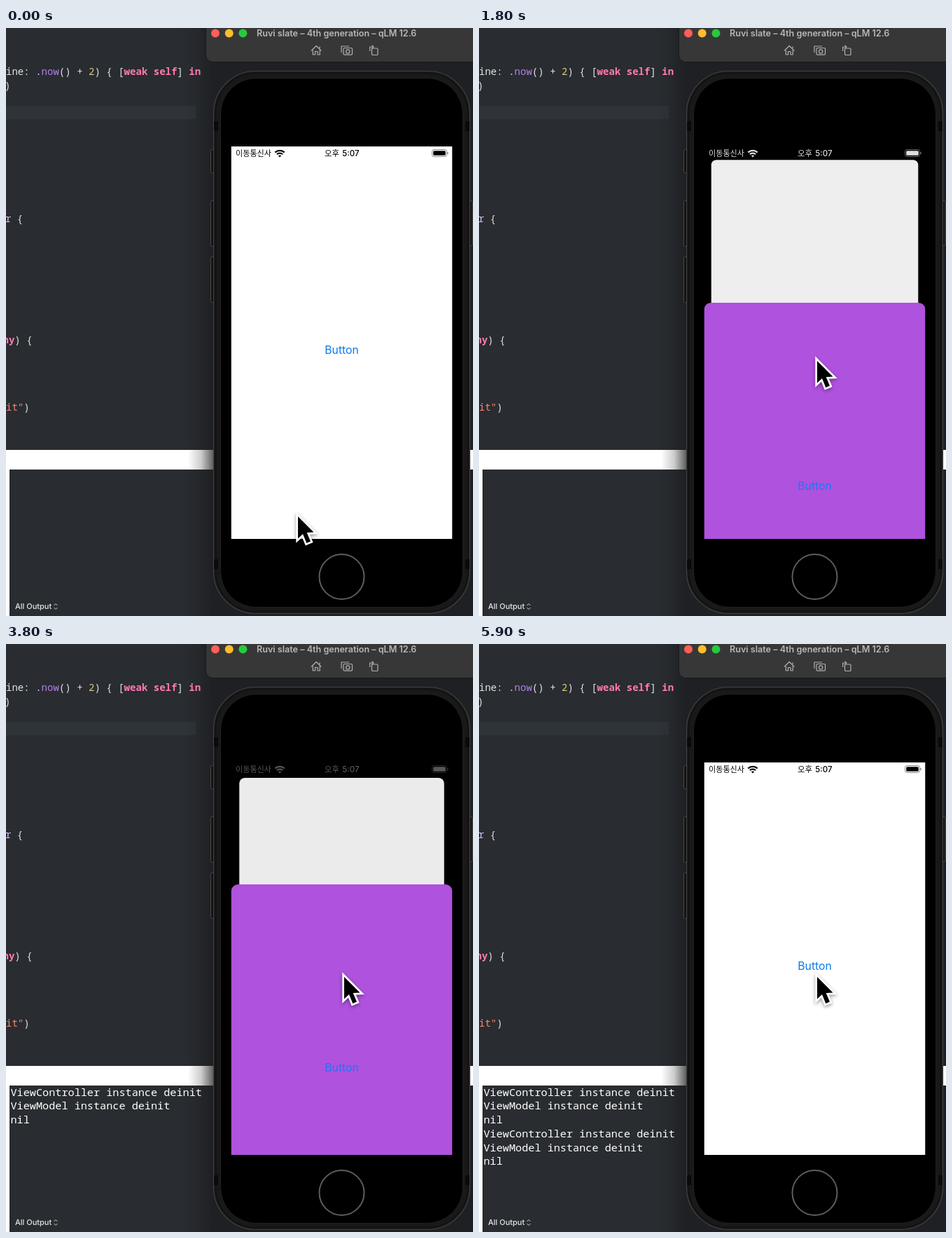
Animation, 667 px wide and 839 px high, one loop 7.9 s. Source, as an HTML page with a canvas:

```html
<!DOCTYPE html>
<html lang="en">
<head>
<meta charset="utf-8">
<title>Sheet demo</title>
<style>
  html, body { margin: 0; width: 100%; height: 100%; overflow: hidden; background: #292c30; }
  canvas { display: block; width: 667px; height: 839px; }
</style>
</head>
<body>
<canvas id="stage"></canvas>
<script>
const W = 667, H = 839, LOOP = 7900, TICK = 100;
const MONO = '"Noto Sans Mono", "DejaVu Sans Mono", monospace';
const SANS = 'Inter, Roboto, sans-serif';
const HANGUL = '"Noto Sans CJK KR", "Noto Sans CJK", "Noto Sans CJK JP", sans-serif';
const WHITE = '#e2e2e3', PINK = '#ff7ab2', BG = '#292c30';
const SCREEN = { x: 321.5, y: 169, w: 316, h: 560 };
const CX = 479.5, CY = 449;
const SHEET_TOP = 208.5, BOTTOM = 729;

// Sheet transitions: start time and direction
const MOVES = [[1004, 1], [1732, 0], [3655, 1], [4397, 0]];
const LOGS = [
  [2400, 'ViewController instance deinit'], [2400, 'ViewModel instance deinit'], [3200, 'nil'],
  [5000, 'ViewController instance deinit'], [5000, 'ViewModel instance deinit'], [5900, 'nil']
];
const PRESSES = [[900, 1100], [1700, 1800], [3600, 3700], [4300, 4400]];

const canvas = document.getElementById('stage');
const dpr = window.devicePixelRatio || 1;
canvas.width = W * dpr;
canvas.height = H * dpr;
const c = canvas.getContext('2d');

const clamp = v => Math.max(0, Math.min(1, v));
const mix = (a, b, k) => a + (b - a) * k;
const smooth = v => { v = clamp(v); return v * v * (3 - 2 * v); };
const rgb = (a, b, k) => `rgb(${a.map((v, i) => Math.round(mix(v, b[i], k))).join()})`;

// Critically damped spring, 0 to 1
function spring(ms) {
  const x = Math.max(0, ms) * 0.01826;
  return 1 - (1 + x) * Math.exp(-x);
}

function rect(x, y, w, h, fill) {
  c.fillStyle = fill;
  c.fillRect(x, y, w, h);
}

function round(x, y, w, h, r, fill, stroke, line = 1) {
  c.beginPath();
  c.roundRect(x, y, w, h, r);
  if (fill) { c.fillStyle = fill; c.fill(); }
  if (stroke) { c.strokeStyle = stroke; c.lineWidth = line; c.stroke(); }
}

function circle(x, y, r, fill, stroke, line = 1) {
  c.beginPath();
  c.arc(x, y, r, 0, Math.PI * 2);
  if (fill) { c.fillStyle = fill; c.fill(); }
  if (stroke) { c.strokeStyle = stroke; c.lineWidth = line; c.stroke(); }
}

function text(s, x, y, font, fill, align = 'left') {
  c.font = font;
  c.fillStyle = fill;
  c.textAlign = align;
  c.fillText(s, x, y);
}

function line(points, close) {
  c.beginPath();
  points.forEach(([x, y]) => c.lineTo(x, y));
  if (close) c.closePath();
}

function code(x, y, parts) {
  for (const [s, color = WHITE, weight = 500] of parts) {
    text(s, x, y, `${weight} 14.05px ${MONO}`, color);
    x += s.length * 8.43;
  }
}

function fade(x0, x1, alpha) {
  const g = c.createLinearGradient(x0, 0, x1, 0);
  g.addColorStop(0, 'rgba(0,0,0,0)');
  g.addColorStop(0.5, `rgba(0,0,0,${alpha * 0.3})`);
  g.addColorStop(1, `rgba(0,0,0,${alpha})`);
  return g;
}

function editor() {
  rect(0, 0, W, H, BG);
  rect(0, 111, 271, 19, '#2f3439');
  rect(0, 602, W, 28, '#fff');
  rect(0, 602, 5, H - 602, '#fff');
  rect(250, 0, W - 250, 602, fade(250, 296, 0.28));
  rect(250, 630, W - 250, H - 630, fade(250, 296, 0.28));
  rect(260, 602, 44, 28, fade(260, 297, 0.65));

  code(0, 67, [['ine: .'], ['now', '#b281eb'], ['() + '], ['2', '#d9c97c'], [') { ['],
    ['weak', PINK, 700], [' '], ['self', PINK, 700], ['] '], ['in', PINK, 700]]);
  code(-2, 86.5, [[')']]);
  code(-1, 277, [['r', '#dabaff'], [' {']]);
  code(-4.5, 450, [['ny', PINK, 700], [') {']]);
  code(0, 546, [['it"', '#ff8170'], [')']]);

  text('All Output', 13, 829, `500 11px ${SANS}`, '#e8e8e8');
  c.strokeStyle = '#d0d0d0';
  c.lineWidth = 1;
  line([[68.5, 824], [71, 821.5], [73.5, 824]]);
  c.stroke();
  line([[68.5, 827], [71, 829.5], [73.5, 827]]);
  c.stroke();
}

function titleBar() {
  round(285.5, -12, 400, 60.5, 10, '#373737', '#1a1a1a');
  ['#ff5f57', '#febc2e', '#28c840'].forEach((color, i) => circle(299 + i * 19.7, 7.5, 6, color));
  text('Ruvi slate – 4th generation – qLM 12.6', 358, 12, `600 12.6px ${SANS}`, '#b8b8b8');

  c.strokeStyle = '#b2b2b2';
  c.lineWidth = 1.2;
  c.lineJoin = 'round';
  line([[436, 32.5], [443.2, 25.5], [450.4, 32.5]]);
  c.stroke();
  line([[438.3, 31.5], [438.3, 38], [441.5, 38], [441.5, 33.5], [445, 33.5], [445, 38], [448.2, 38], [448.2, 31.5]]);
  c.stroke();
  line([[448, 29], [448, 26.5]]);
  c.stroke();

  line([[479, 35], [479, 26], [490, 26]]);
  c.stroke();
  round(482, 28.5, 12.5, 9.7, 1.5, '#373737', '#b2b2b2', 1.2);
  circle(488.2, 33.4, 2.6, null, '#b2b2b2', 1.2);

  round(522.5, 29, 8.5, 9.5, 1.3, null, '#b2b2b2', 1.2);
  line([[519.7, 33], [519.7, 27], [524.5, 27]]);
  c.stroke();
  line([[522.5, 24.8], [525, 27], [522.5, 29.2]]);
  c.stroke();
}

function phone() {
  for (const [y, h] of [[173, 33], [246, 65], [326, 65]]) {
    round(292.5, y + 0.5, 8, h, 2, '#111', '#4a4a4a');
  }
  round(659, 246.5, 7, 64, 2, '#111', '#4a4a4a');
  round(296.5, 61.5, 366, 774, 60, '#191919', '#424242', 1.2);
  round(299.5, 64.5, 360, 768, 57, null, '#111', 1.5);
  for (const y of [133, 758]) {
    rect(297, y, 6, 14, '#0a0a0a');
    rect(656, y, 6, 14, '#0a0a0a');
  }
  round(306.5, 71.5, 346, 755, 51, '#000', '#202020', 1);
  circle(479.5, 783, 32, '#000', '#5d5d5d', 2);
}

function buttonLabel(x, y, color, alpha) {
  c.globalAlpha = alpha;
  text('Button', x, y + 5.7, `400 15.7px ${SANS}`, color, 'center');
  c.globalAlpha = 1;
}

function statusBar(k) {
  const ink = rgb([0, 0, 0], [245, 245, 245], k);
  text('이동통신사', 328, 183, `400 11.1px ${HANGUL}`, ink);
  text('오후 ', 455, 183, `500 11.4px ${HANGUL}`, ink);
  text('5:07', 504.5, 183, `500 11.5px ${SANS}`, ink, 'right');

  c.save();
  c.beginPath();
  c.moveTo(391, 184.5);
  c.arc(391, 184.5, 11, -Math.PI * 0.74, -Math.PI * 0.26);
  c.closePath();
  c.clip();
  circle(391, 184.5, 9.6, null, ink, 2.4);
  circle(391, 184.5, 5.9, null, ink, 2.2);
  circle(391, 184.5, 3, ink);
  c.restore();

  c.globalAlpha = 0.45;
  round(608.5, 173.5, 21, 10, 3, null, ink);
  round(630.3, 176.7, 1.4, 3.6, 0.7, ink);
  c.globalAlpha = 1;
  round(610.2, 175.2, 17.6, 6.6, 1.6, ink);
}

function screen(p, ink, pressed) {
  const { x, y, w, h } = SCREEN;
  c.save();
  c.beginPath();
  c.rect(x, y, w, h);
  c.clip();
  rect(x, y, w, h, '#000');

  // Card behind the sheet
  c.save();
  c.translate(CX, CY + 1.6 * p);
  c.scale(1 - 0.1 * p, 1 - 0.1 * p);
  round(-w / 2, -h / 2, w, h + 60, 10 * clamp(p * 1.2), rgb([255, 255, 255], [228, 228, 228], p));
  buttonLabel(0, 10.5, rgb([8, 121, 234], [142, 142, 147], clamp(p * 2)), pressed && p < 0.1 ? 0.3 : 1);
  c.restore();

  statusBar(ink);

  if (p > 0.0005) {
    const top = mix(BOTTOM, SHEET_TOP, p);
    round(x, top, w, h, 10, '#af52de');
    buttonLabel(CX, top + 261, '#1877f8', pressed && p > 0.9 ? 0.3 : 1);
  }
  c.restore();
}

function cursor(t) {
  const k = smooth(t / 800);
  c.save();
  c.translate(mix(417, 483, k), mix(697, 475, k));
  line([[0, 0], [0, 31.5], [7, 25], [12.3, 38], [18, 35.6], [12.7, 23], [22.5, 22.5]], true);
  c.lineJoin = 'miter';
  c.lineWidth = 5.5;
  c.strokeStyle = '#fff';
  c.shadowColor = 'rgba(0,0,0,0.4)';
  c.shadowBlur = 5 * dpr;
  c.shadowOffsetY = 2 * dpr;
  c.stroke();
  c.shadowColor = 'transparent';
  c.fillStyle = '#000';
  c.fill();
  c.restore();
}

function draw(t) {
  let p = 0, ink = 0;
  for (const [start, up] of MOVES) {
    if (t < start) break;
    const q = spring(t - start), s = smooth((t - start) / 360);
    p = up ? q : 1 - q;
    ink = up ? s : 1 - s;
  }
  const pressed = PRESSES.some(([a, b]) => t >= a && t < b);

  c.setTransform(dpr, 0, 0, dpr, 0, 0);
  editor();
  LOGS.forEach(([at, s], i) => {
    if (t >= at) text(s, 6.5, 644.6 + i * 19.75, `500 15.2px ${MONO}`, '#fff');
  });
  phone();
  titleBar();
  screen(p, ink, pressed);
  cursor(t);
}

let begin = null;
function loop(now) {
  if (begin === null) begin = now;
  draw(Math.floor(((now - begin) % LOOP) / TICK) * TICK);
  requestAnimationFrame(loop);
}
draw(0);
requestAnimationFrame(loop);
</script>
</body>
</html>
```
